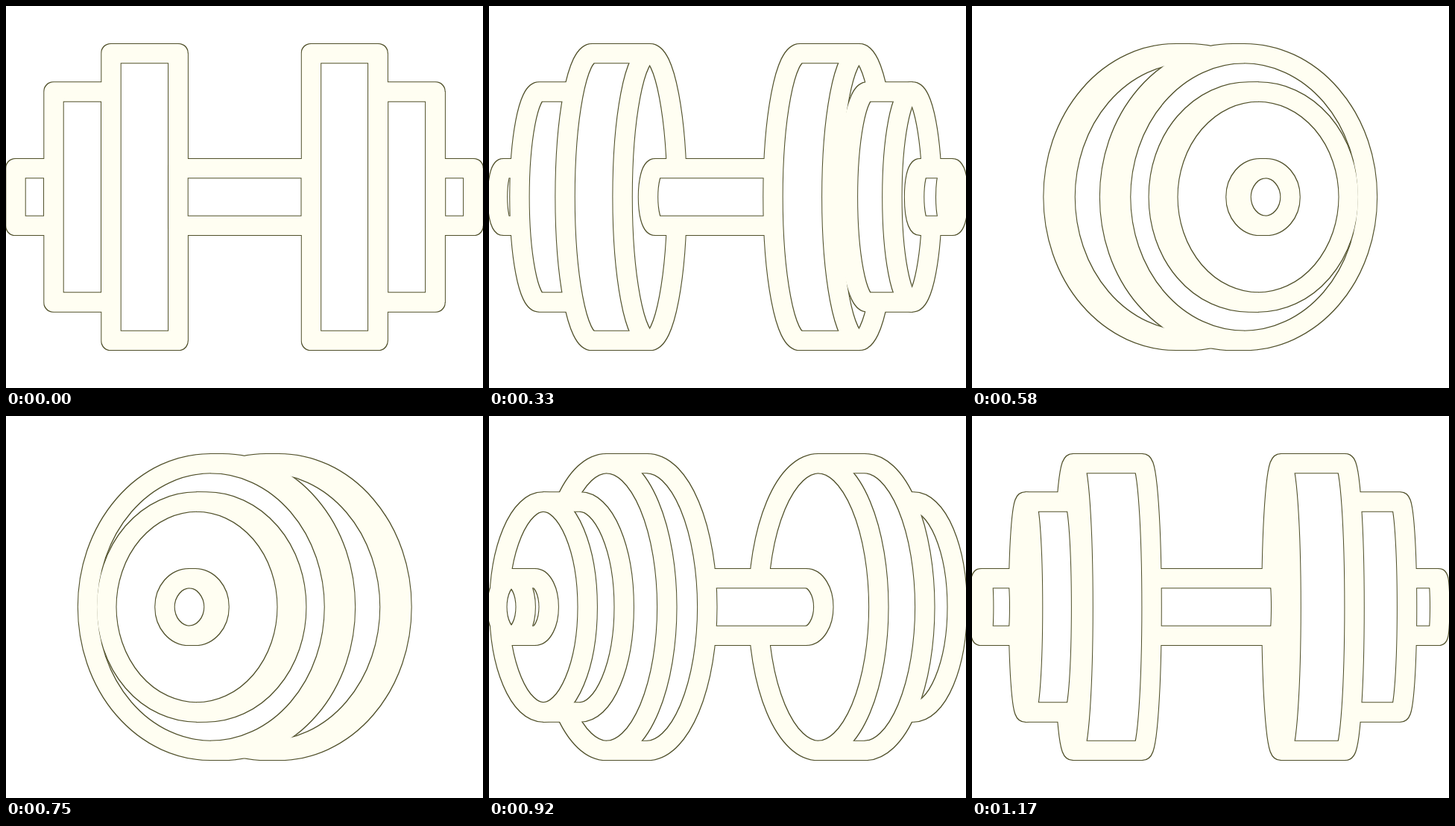
Animation, 640 px wide and 512 px high, one loop 1260 ms. Source, as an HTML page:

```html
<!DOCTYPE html>
<html lang="en">
<head>
<meta charset="utf-8">
<title>Turning dumbbell</title>
<style>
  html, body { margin: 0; width: 100%; height: 100%; overflow: hidden; background: #fff; }
  svg { display: block; width: 640px; height: 512px; }
  #shape path { fill: #000; stroke: #fff; stroke-width: 25.4; stroke-linejoin: round; }
  #shape path.rim { fill: none; }
</style>
</head>
<body>
<svg viewBox="0 0 640 512">
  <defs>
    <filter id="outline" filterUnits="userSpaceOnUse" x="-20" y="0" width="680" height="512" color-interpolation-filters="sRGB">
      <feMorphology in="SourceAlpha" operator="dilate" radius="1" result="grown"/>
      <feFlood flood-color="#50502a"/>
      <feComposite in2="grown" operator="in" result="edge"/>
      <feMerge><feMergeNode in="edge"/><feMergeNode in="SourceGraphic"/></feMerge>
    </filter>
    <mask id="cut" maskUnits="userSpaceOnUse" x="-20" y="0" width="680" height="512">
      <g id="shape"></g>
    </mask>
  </defs>
  <g filter="url(#outline)">
    <rect x="-20" width="680" height="512" fill="#fffef2" mask="url(#cut)"/>
  </g>
</svg>
<script>
const LOOP = 1260;
const PLATE = 192.4, COLLAR = 141, BAR = 38.4;

// Roundness of the faces at each step of the half turn; past END_ON the view is mirrored.
const TURN = [0, .005, .018, .045, .19, .42, .65, .86, 1, .86, .65, .42, .22, .12, .068];
const END_ON = 8;

// Columns: face roundness (plates, end caps, bar), then positions along the axis:
// left cap, left collar, left plate back and front, bar start,
// right plate back and front, right collar back and front, right cap back and front.
const POSES = [
  [0, 0, 0, -307, -256, -179, -89, -89, 89.5, 179, 179.5, 256, 256.5, 307],
  [.045, .05, .05, -304, -256, -179, -93, -91, 93, 176, 183, 254, 258, 305],
  [.068, .07, .07, -305, -254, -180, -95, -92, 92, 184, 183, 248, 259, 307],
  [.42, .5, .62, -291, -249, -184, -122, -105, 108, 162, 198, 247, 259, 290],
  [.86, .86, .86, -74, -64, -45.5, -29.5, -29.5, 30, 45, 51.5, 64, 67, 74],
  [1, 1, 1, 0, 0, 0, 0, 0, 0, 0, 0, 0, 0, 0]
];

const shape = document.getElementById("shape");

function poseAt(k) {
  const i = Math.max(1, POSES.findIndex(row => row[0] >= k));
  const from = POSES[i - 1], to = POSES[i];
  const u = (k - from[0]) / (to[0] - from[0]);
  return from.map((v, c) => v + (to[c] - v) * u);
}

// A disc or rod seen at an angle: its silhouette and the rim of its near face.
function cylinder(back, front, r, roundness) {
  const arc = `A${r * roundness} ${r} 0 0`;
  return `<path d="M${back} ${-r}H${front}${arc} 1 ${front} ${r}H${back}${arc} 1 ${back} ${-r}Z"/>` +
    `<path class="rim" d="M${front} ${-r}${arc} 0 ${front} ${r}"/>`;
}

function draw(step) {
  const [k, capK, barK, capL, collarL, backL, frontL, bar,
    backR, frontR, collarB, collarF, capB, capF] = poseAt(TURN[step]);
  shape.setAttribute("transform", `translate(320 256) scale(${step > END_ON ? -1 : 1} 1)`);
  shape.innerHTML =
    cylinder(capL, collarL, BAR, capK) +
    cylinder(collarL, backL, COLLAR, k) +
    cylinder(backL, frontL, PLATE, k) +
    cylinder(bar, backR, BAR, barK) +
    cylinder(backR, frontR, PLATE, k) +
    cylinder(collarB, collarF, COLLAR, k) +
    cylinder(capB, capF, BAR, capK);
}

// Steps last 84 ms, with their starts rounded down to 10 ms.
function stepAt(ms) {
  const tick = Math.floor((ms % LOOP) / 10);
  return Math.ceil((tick + 1) * 5 / 42) - 1;
}

const start = performance.now();
let shown = -1;
function frame() {
  const step = stepAt(performance.now() - start);
  if (step !== shown) draw(shown = step);
  requestAnimationFrame(frame);
}
frame();
</script>
</body>
</html>
```
